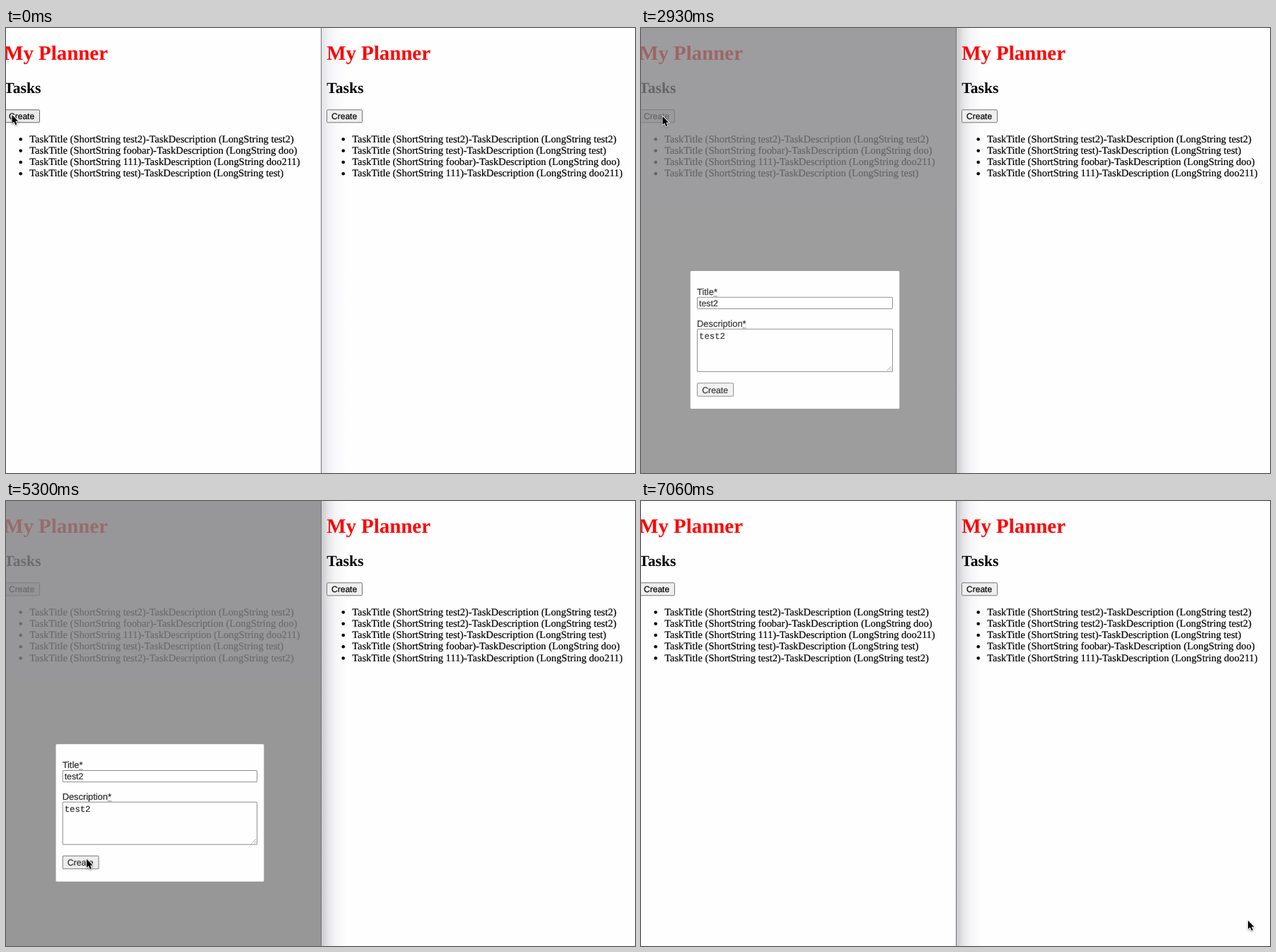
Recreate the animation shown at these times as an HTML page. Size 889 by 630 pixels, loop 7.1 s.

```html
<!DOCTYPE html>
<html lang="en">
<head>
<meta charset="utf-8">
<title>My Planner</title>
<style>
  html, body { margin: 0; width: 100%; height: 100%; overflow: hidden; background: #fefefe; }
  svg { display: block; }
  text {
    font: 14.445px "Liberation Serif", Times, serif;
    white-space: pre;
    text-rendering: geometricPrecision;
    stroke: #000;
    stroke-width: .2px;
  }
  .h1 { font-size: 28.89px; font-weight: bold; fill: red; stroke: none; }
  .h2 { font-size: 21.67px; font-weight: bold; stroke: none; }
  .ui { font: 12.04px "Liberation Sans", Arial, sans-serif; }
  .label { font: 12.64px "Liberation Sans", Arial, sans-serif; }
  .mono { font: 12.04px "Liberation Mono", "Courier New", monospace; }
  .button { fill: #efefef; stroke: #767676; }
  .button.hover { fill: #e9e9e9; stroke: #666; }
  .field { fill: #fefefe; stroke: #767676; }
  #cursor { filter: drop-shadow(0 1px 1px rgba(0, 0, 0, .4)); }
</style>
</head>
<body>
<svg id="stage" width="889" height="630" viewBox="0 0 889 630"></svg>
<script>
const LOOP = 7100;
const SHADOW_AT = 360, OPEN_AT = 2845, FOCUS_AT = 3800, BLUR_AT = 5160, SAVE_AT = 5230, CLOSE_AT = 5275;
const FADE = 180;

// Easing shapes for cursor segments
const linear = u => u;
const accelerate = u => u ** 1.6;
const decelerate = u => 1 - (1 - u) ** 2;
const smooth = u => u * u * (3 - 2 * u);

// Cursor waypoints: time, x, y, easing used to arrive there
const path = [
  [0, 8.5, 123], [100, 8.5, 123], [101, 9, 124], [730, 9, 124],
  [1160, 32, 127, accelerate], [1430, 147.5, 170, accelerate], [1560, 204.5, 196, decelerate],
  [1700, 204.5, 196], [2400, 35, 129, smooth], [2560, 31, 126, decelerate],
  [2860, 31, 126], [2930, 30.5, 125], [2960, 30.5, 125],
  [3430, 150, 345, smooth], [3750, 169.5, 386, decelerate], [4330, 169.5, 386],
  [4660, 125.5, 520.5, smooth], [4960, 114, 507, smooth], [5830, 114, 507],
  [6300, 422, 400, smooth], [6700, 422, 400], [7060, 858, 594, smooth], [LOOP, 858, 594]
];

const text = (x, y, s, cls = '') => `<text x="${x}" y="${y}" class="${cls}">${s}</text>`;
const task = (title, description) =>
  `TaskTitle (ShortString ${title})-TaskDescription (LongString ${description})`;
const button = (x, y, id) =>
  `<rect id="${id}" class="button" x="${x + .5}" y="${y + .5}" width="50" height="18" rx="1.5"/>` +
  text(x + 7, y + 14, 'Create', 'ui');
const list = (id, items) => `<g id="${id}">` + items.map((item, i) => {
  const y = 161.7 + i * 16.25;
  return `<circle cx="476.7" cy="${y - 4.2}" r="2.3"/>` + text(489.2, y, item);
}).join('') + '</g>';
const page = (side, before, after) =>
  text(453.2, 45.4, 'My Planner', 'h1') + text(453.2, 92.2, 'Tasks', 'h2') +
  button(453, 115.3, side + 'Button') + list(side + 'Before', before) + list(side + 'After', after);
const shade = (id, colors) => `<linearGradient id="${id}">` +
  colors.map((c, i) => `<stop offset="${[0, .28, .55, 1][i]}" stop-color="${c}"/>`).join('') +
  '</linearGradient>';
const label = (y, s, starX) => text(82, y, s + '*', 'label') +
  `<path d="M${starX} ${y + 1.7}h5" stroke="#000" stroke-dasharray="1 1"/>`;

const test2 = task('test2', 'test2'), test = task('test', 'test');
const foobar = task('foobar', 'doo'), ones = task('111', 'doo211');
const left = [test2, foobar, ones, test];
const right = [test2, test, foobar, ones];

document.getElementById('stage').innerHTML = `
  <defs>
    ${shade('soft', ['#e3e3e5', '#f2f2f5', '#f9f9fc', '#fefefe'])}
    ${shade('strong', ['#cbcbcd', '#e6e6e8', '#f5f5f8', '#fefefe'])}
    <clipPath id="leftPane"><path d="M0 0H445V630H0Z"/></clipPath>
  </defs>
  <path fill="#fefefe" d="M0 0H889V630H0Z"/>
  <rect id="shadow" x="446" width="35" height="630"/>
  ${page('right', right, [test2, ...right])}
  <g clip-path="url(#leftPane)">
    <g transform="translate(-456)">${page('left', left, [...left, test2])}</g>
    <g id="modal">
      <path fill="#828284" d="M0 0H445V630H0Z"/>
      <g id="dialog">
        <rect x="73" y="346" width="289" height="191" rx="1.5" fill="#fefefe"/>
        ${label(379.3, 'Title', 105)}
        <rect id="title" class="field" x="82.5" y="382.5" width="270" height="16" rx="1.5"/>
        ${text(85, 394.6, 'test2', 'ui')}
        ${label(423.4, 'Description', 145)}
        <rect class="field" x="82.5" y="426.5" width="270" height="59" rx="1"/>
        <path d="M345 484l6-6M348.5 484l2.5-2.5" stroke="#777" stroke-width=".8"/>
        ${text(85, 439.8, 'test2', 'mono')}
        ${button(82, 501, 'submit')}
      </g>
    </g>
  </g>
  <path fill="#70747a" d="M445 0h1V630h-1Z"/>
  <g id="cursor">
    <path id="arrow" d="M0 0V12L2.8 9.6 4.9 14.2 6.9 13.3 4.9 8.8H8.6Z"
      stroke="#fff" stroke-width="1.6" paint-order="stroke"/>
    <path id="beam" d="M-3-7.5Q0-7.5 0-5.5Q0-7.5 3-7.5M0-5.5V5.5M-3 7.5Q0 7.5 0 5.5Q0 7.5 3 7.5M-1.5 2.5h3"
      fill="none" stroke="#222"/>
  </g>`;

const $ = id => document.getElementById(id);
const show = (id, on) => $(id).setAttribute('visibility', on ? 'visible' : 'hidden');
const inside = ([x, y], x0, y0, x1, y1) => x >= x0 && x <= x1 && y >= y0 && y <= y1;

// CSS "ease": cubic-bezier(.25, .1, .25, 1)
function ease(u) {
  if (u <= 0 || u >= 1) return u <= 0 ? 0 : 1;
  const curve = (a, b, s) => 3 * a * s * (1 - s) ** 2 + 3 * b * s * s * (1 - s) + s ** 3;
  let low = 0, high = 1;
  for (let i = 0; i < 20; i++) {
    const mid = (low + high) / 2;
    if (curve(.25, .25, mid) < u) low = mid; else high = mid;
  }
  return curve(.1, 1, low);
}

function cursorAt(t) {
  const i = path.findIndex(p => p[0] > t);
  const [t0, x0, y0] = path[i - 1], [t1, x1, y1, shape = linear] = path[i];
  const k = shape((t - t0) / (t1 - t0));
  return [x0 + (x1 - x0) * k, y0 + (y1 - y0) * k];
}

function render(t) {
  const opacity = ease((t - OPEN_AT) / FADE) - ease((t - CLOSE_AT) / FADE);
  const modal = opacity > 0;
  const scale = 1.1 - .1 * opacity;
  $('modal').setAttribute('opacity', opacity);
  show('modal', modal);
  $('dialog').setAttribute('transform',
    `translate(217.5 441.5) scale(${scale}) translate(-217.5 -441.5)`);

  const focused = t >= FOCUS_AT && t < BLUR_AT;
  $('title').style.cssText = focused ? 'stroke:#000;stroke-width:2' : '';
  $('shadow').setAttribute('fill', t < SHADOW_AT ? 'url(#soft)' : 'url(#strong)');

  for (const side of ['left', 'right']) {
    show(side + 'Before', t < SAVE_AT);
    show(side + 'After', t >= SAVE_AT);
  }

  const point = cursorAt(t);
  const overText = modal
    ? inside(point, 82, 382, 353, 399) || inside(point, 82, 426, 353, 486)
    : inside(point, 33, 149, 416, 215);
  $('cursor').setAttribute('transform', `translate(${point})`);
  show('arrow', !overText);
  show('beam', overText);
  $('leftButton').classList.toggle('hover', !modal && inside(point, 0, 115, 48, 135));
  $('submit').classList.toggle('hover', modal && inside(point, 82, 501, 133, 520));
}

function tick() {
  render(performance.now() % LOOP);
  requestAnimationFrame(tick);
}
tick();
</script>
</body>
</html>
```
